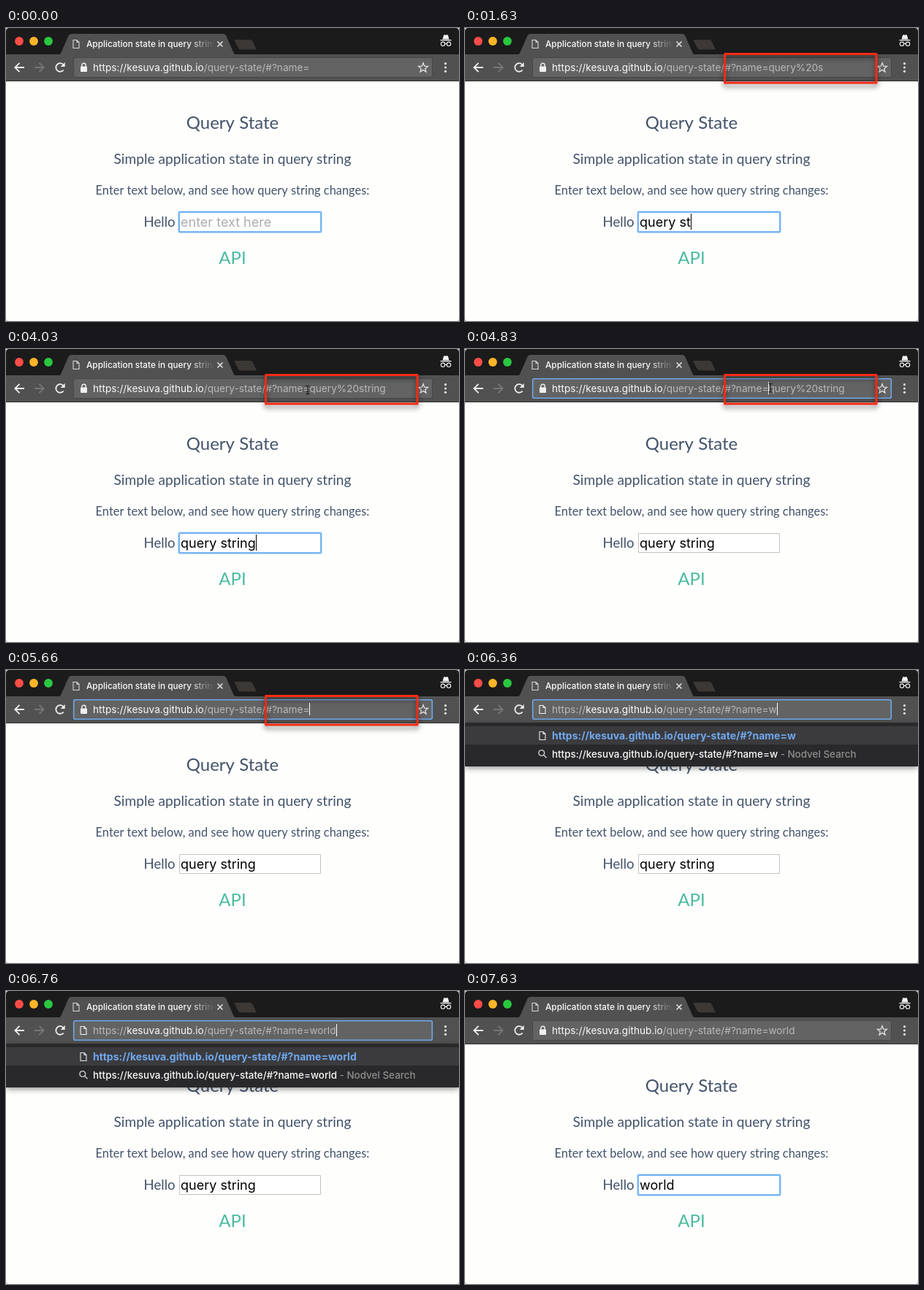
An HTML page with a canvas for the animation above (8000 ms loop, 620 by 401 pixels).

```html
<!DOCTYPE html>
<html lang="en">
<head>
<meta charset="utf-8">
<title>Query State</title>
<style>
html, body { margin: 0; width: 620px; height: 401px; overflow: hidden; background: #fff; }
canvas { display: block; }
</style>
</head>
<body>
<canvas id="stage" width="620" height="401"></canvas>
<script>
const ctx = document.getElementById('stage').getContext('2d');
const LOOP = 8000;
const UI = 'Inter, Roboto, sans-serif';
const PAGE = 'Lato, "Open Sans", sans-serif';
const URL_FONT = `13.63px ${UI}`;
const INPUT_FONT = `18px ${UI}`;
const HOST = 'kesuva.github.io';
const PATH = '/query-state/#?name=';
const WHITE = '#fafafa', GREY = '#b9b9b9', BLUE = '#6fa8ee';

// [time, value] keys: a value holds until the next key
const typed = [[0, ''], [860, 'q'], [930, 'qu'], [1000, 'que'], [1100, 'quer'], [1160, 'query'],
  [1260, 'query '], [1360, 'query s'], [1630, 'query st'], [1700, 'query str'],
  [1800, 'query stri'], [1860, 'query strin'], [1930, 'query string'], [7160, 'world']];
const param = [[0, ''], [1060, 'que'], [1230, 'query'], [1430, 'query%20s'], [1760, 'query%20str'],
  [2060, 'query%20string'], [5660, ''], [6260, 'w'], [6500, 'wo'], [6660, 'wor'], [6760, 'world']];
const inputCaret = [[430, 2530], [3030, 3530], [4030, 4200], [7160, 7630]];
const barCaret = [[4660, 5400], [5660, 7130]];

const hold = (keys, t) => keys.filter(k => k[0] <= t).pop()[1];
const within = (t, a, b) => t >= a && t < b;
const inAny = (t, spans) => spans.some(s => within(t, s[0], s[1]));
const ramp = (t, a, b) => Math.min(1, Math.max(0, (t - a) / (b - a)));
const smooth = p => p * p * (3 - 2 * p);
const mix = (a, b, p) => a + (b - a) * p;

function rect(x, y, w, h, color) {
  ctx.fillStyle = color;
  ctx.fillRect(x, y, w, h);
}
function box(x, y, w, h, r, fill, stroke, width = 1) {
  ctx.beginPath();
  ctx.roundRect(x, y, w, h, r);
  if (fill) { ctx.fillStyle = fill; ctx.fill(); }
  if (stroke) { ctx.strokeStyle = stroke; ctx.lineWidth = width; ctx.stroke(); }
}
function dot(x, y, r, color) {
  ctx.beginPath();
  ctx.arc(x, y, r, 0, 7);
  ctx.fillStyle = color;
  ctx.fill();
}
function shape(d, fill, stroke, width = 1) {
  const p = new Path2D(d);
  if (fill) { ctx.fillStyle = fill; ctx.fill(p); }
  if (stroke) { ctx.strokeStyle = stroke; ctx.lineWidth = width; ctx.stroke(p); }
}
function text(str, x, y, font, color, align = 'left') {
  ctx.font = font;
  ctx.fillStyle = color;
  ctx.textAlign = align;
  ctx.fillText(str, x, y);
}
function measure(str, font) {
  ctx.font = font;
  return ctx.measureText(str).width;
}
// Draws [string, color] parts one after another
function run(x, y, font, parts) {
  for (const [str, color] of parts) {
    text(str, x, y, font, color);
    x += measure(str, font);
  }
}

function docIcon(x, y, color) {
  ctx.save();
  ctx.translate(x, y);
  shape('M-4-5.500H1L4-2.500V5.500H-4ZM1-5.500V-2.500H4', null, color, 1.1);
  ctx.restore();
}

function titleBar() {
  rect(0, 0, 620, 37, '#1b1b1c');
  dot(18, 18, 5.9, '#fc4d48');
  dot(38, 18, 5.9, '#fdb528');
  dot(58, 18, 5.9, '#2ac840');
  shape('M72 37Q74.500 36 75.500 33.500L85.500 10.500Q86.800 8 89.500 8H297.500Q300 8 301.300 10.500L311.300 33.500Q312.300 36 315 37Z', '#515151');
  shape('M313 16H334Q336.500 16 337.500 18L343 29.500H321.500Q319 29.500 318 27.500L312.500 17Z', '#3b3835');
  docIcon(96, 22, '#d8d8d8');
  const fade = ctx.createLinearGradient(250, 0, 285, 0);
  fade.addColorStop(0, WHITE);
  fade.addColorStop(1, 'rgba(250,250,250,0)');
  ctx.save();
  ctx.beginPath();
  ctx.rect(104, 8, 180, 28);
  ctx.clip();
  text('Application state in query string', 110, 26, `500 11.8px ${UI}`, fade);
  ctx.restore();
  shape('M289.500 18.500L296.500 25.500M296.500 18.500L289.500 25.500', null, '#dedede', 1.6);
  // private-mode badge
  shape('M597.500 15.500L599 10Q599.500 9 600.500 9.300L602 9.800L603.500 9.300Q604.500 9 605 10L606.500 15.500Z', '#f2f2f2');
  rect(594.5, 16, 15, 1.3, '#f2f2f2');
  shape('M600.700 21.800A2.700 2.700 0 1 1 595.300 21.800A2.700 2.700 0 1 1 600.700 21.800Q602 20.700 603.300 21.800A2.700 2.700 0 1 1 608.700 21.800A2.700 2.700 0 1 1 603.300 21.800', null, '#f2f2f2', 1.1);
}

function toolbar(t) {
  const focus = within(t, 4200, 7130);
  const editing = within(t, 6260, 7130);
  const value = hold(param, t);
  rect(0, 36, 620, 36, '#515151');
  rect(0, 72, 620, 1, '#303030');

  shape('M25 54H12.500M18.500 47.800L12.300 54L18.500 60.200', null, '#efefef', 1.8);
  shape('M39 54H51.500M45.500 47.800L51.700 54L45.500 60.200', null, '#767676', 1.8);
  shape('M78.700 57.500A5.800 5.800 0 1 1 78.200 49.800', null, '#efefef', 1.8);
  shape('M80.700 47V53H74.700Z', '#efefef');
  for (const y of [48.7, 54, 59.3]) dot(601.5, y, 1.6, '#e4e4e4');

  box(92.5, 40.5, 491, 27, 2.5, '#636363', focus ? null : '#474747');
  if (focus) box(92.7, 40.7, 490.6, 26.6, 2, null, BLUE, 1.6);

  if (editing) docIcon(106, 54, '#f0f0f0');
  else {
    box(102, 52.5, 9, 7.5, 1, '#f0f0f0');
    shape('M103.800 53V51A2.700 2.700 0 0 1 109.200 51V53', null, '#f0f0f0', 1.4);
    let star = '';
    for (let i = 0; i < 10; i++) {
      const a = i * Math.PI / 5 - Math.PI / 2, r = i % 2 ? 2.9 : 6.8;
      star += `${i ? 'L' : 'M'}${571 + r * Math.cos(a)} ${54.5 + r * Math.sin(a)}`;
    }
    shape(star + 'Z', null, '#e2e2e2', 1.3);
  }

  const nameEnd = 119 + measure('https://' + HOST + PATH, URL_FONT);
  const end = nameEnd + measure(value, URL_FONT);
  if (within(t, 4330, 4560)) rect(119, 45, end - 119, 18, '#6f94c4');
  if (within(t, 5600, 5660)) rect(nameEnd, 45, end - nameEnd, 18, '#6f94c4');
  run(119, 59, URL_FONT, [['https://', editing ? GREY : WHITE], [HOST, WHITE], [PATH + value, GREY]]);
  if (inAny(t, barCaret)) rect(Math.round(t < 5600 ? nameEnd : end), 45, 1, 17, '#fff');
}

function page(t) {
  const ink = '#43536a';
  rect(0, 73, 620, 328, '#fefefd');
  ctx.save();
  ctx.letterSpacing = '0.01px'; // keeps letters unligated
  text('Query State', 310, 138, `24px ${PAGE}`, ink, 'center');
  text('Simple application state in query string', 310, 186, `19.15px ${PAGE}`, ink, 'center');
  text('Enter text below, and see how query string changes:', 310, 228, `16.4px ${PAGE}`, ink, 'center');
  text('Hello', 188.5, 272, `18.6px ${PAGE}`, ink);
  text('API', 310, 323, `24px ${PAGE}`, '#4bbb9f', 'center');
  ctx.restore();

  if (within(t, 4200, 7160)) box(237.5, 252.5, 193, 26, 0, '#fff', '#c2c2c2');
  else {
    box(236, 251, 196, 29, 2.5, null, 'rgba(110,175,245,.4)', 2);
    box(237, 252, 194, 27, 1, '#fff', '#74b4f3', 2);
  }
  const value = hold(typed, t);
  text(value || 'enter text here', 239, 272, INPUT_FONT, value ? '#000' : '#acacac');
  if (inAny(t, inputCaret)) rect(Math.round(239.5 + measure(value, INPUT_FONT)), 254, 1, 22, '#000');
}

function suggestions(t) {
  if (!within(t, 6260, 7130)) return;
  const bottom = mix(206, 132, smooth(ramp(t, 6290, 6355)));
  const address = 'https://' + HOST + PATH + hold(param, t);
  ctx.save();
  ctx.shadowColor = 'rgba(0,0,0,.45)';
  ctx.shadowBlur = 8;
  ctx.shadowOffsetY = 2;
  rect(0, 73, 620, bottom - 73, '#29292b');
  ctx.restore();
  rect(0, 77, 620, 25, '#3b3b3e');
  docIcon(106, 90, '#e6e6e6');
  text(address, 119, 95, `bold 14px ${UI}`, BLUE);
  shape('M108.700 113.500A3.900 3.900 0 1 1 100.900 113.500A3.900 3.900 0 1 1 108.700 113.500M107.600 116.300L111.500 120.200', null, '#cfcfcf', 1.4);
  run(119, 120, `500 13.45px ${UI}`, [[address, WHITE], [' - Nodvel Search', '#8f8f8f']]);
}

function frameMark(t) {
  const alpha = ramp(t, 930, 1200) * (1 - ramp(t, 6260, 6350));
  if (!alpha) return;
  ctx.save();
  ctx.globalAlpha = alpha;
  ctx.shadowColor = 'rgba(0,0,0,.55)';
  ctx.shadowBlur = 7;
  ctx.shadowOffsetY = 4;
  ctx.lineJoin = 'round';
  box(355.5, 35.5, 207.5, 39.5, 0, null, '#fb2a14', 3);
  ctx.restore();
}

function pointer(t) {
  if (!within(t, 3030, 5600)) return;
  const rise = smooth(ramp(t, 3000, 3330)), drop = smooth(ramp(t, 3500, 4000));
  const nudge = smooth(ramp(t, 4560, 4800)), leave = smooth(ramp(t, 4970, 5100));
  const x = mix(554, 471, rise) - 58 * drop + 5 * nudge + 75 * leave;
  const y = mix(380, 8, rise) + 48 * drop - 3 * nudge;
  ctx.save();
  ctx.translate(x, y);
  if (within(y, 40, 68) && t > 3500) {
    shape('M-2.500-6Q0-6 0-4Q0-6 2.500-6M0-4V4M-2.500 6Q0 6 0 4Q0 6 2.500 6M-1.500 2H1.500', null, '#1c1c1c', 1.1);
  } else {
    ctx.lineJoin = 'round';
    shape('M0 0V14L3.300 11L5.600 16.300L8 15.300L5.700 10.200H10.200Z', '#000', '#fff');
  }
  ctx.restore();
}

function draw(now) {
  const t = now % LOOP;
  rect(0, 0, 620, 401, '#d6d6d6');
  ctx.save();
  ctx.beginPath();
  ctx.roundRect(0, 0, 620, 401, 4.5);
  ctx.clip();
  page(t);
  titleBar();
  toolbar(t);
  suggestions(t);
  frameMark(t);
  pointer(t);
  ctx.restore();
  requestAnimationFrame(draw);
}
requestAnimationFrame(draw);
</script>
</body>
</html>
```
